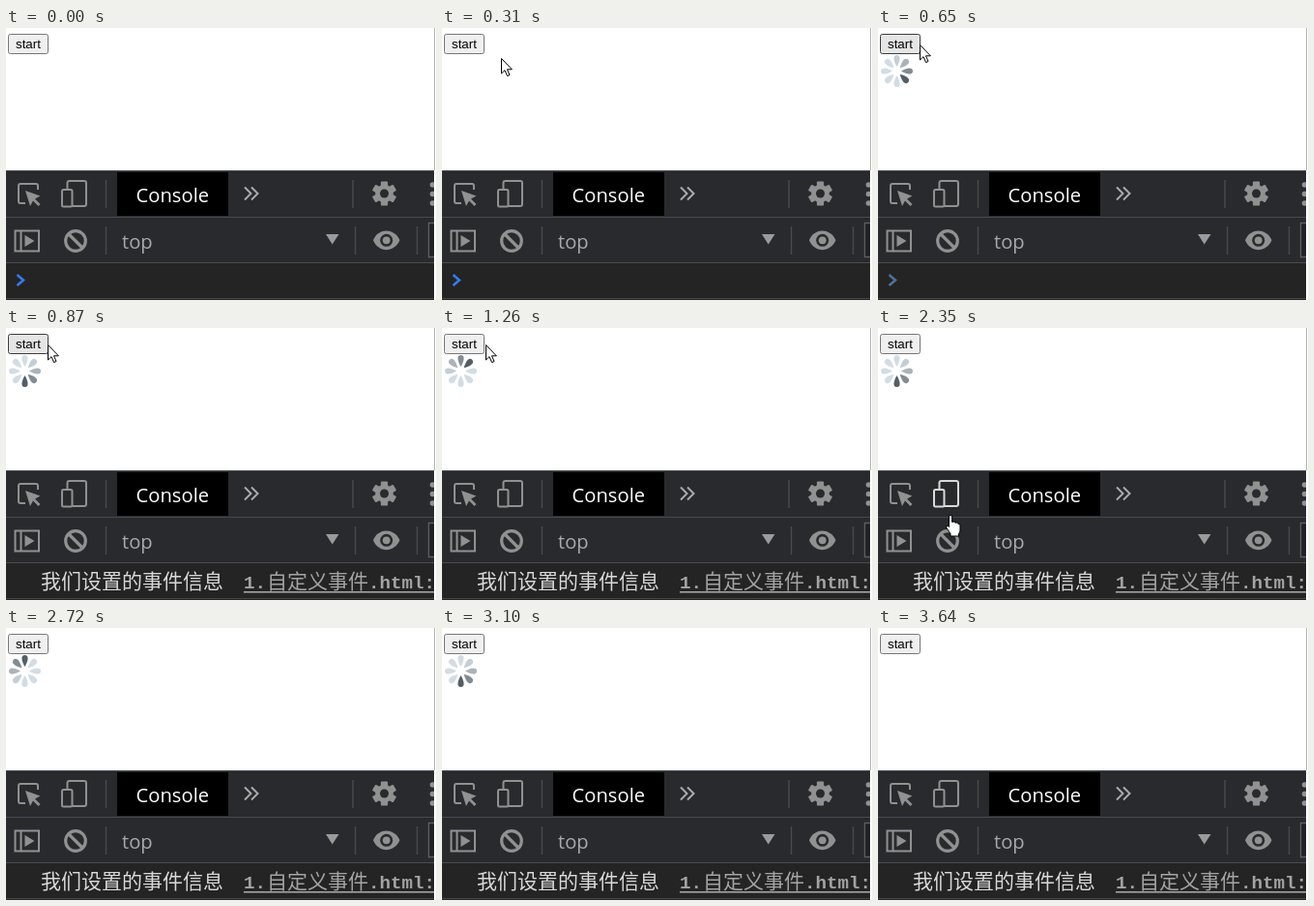
An HTML page that plays this animation: 445x281 px, repeating every 4040 ms.

```html
<!DOCTYPE html>
<html lang="zh">
<head>
<meta charset="utf-8">
<title>Custom event demo</title>
<style>
html, body { margin: 0; width: 100%; height: 100%; overflow: hidden; background: #fff; }
svg { display: block; width: 445px; height: 281px; }
.ui { font: 20.2px "Open Sans", sans-serif; }
.btn { font: 13.33px "Liberation Sans", Arial, sans-serif; }
.cjk { font: 21px "Noto Sans CJK SC", "Noto Sans CJK", sans-serif; }
.mono { font: bold 19.2px "Liberation Mono", monospace; }
.line { fill: none; stroke: #919191; stroke-width: 2; }
.fill { fill: #919191; }
.sep { fill: none; stroke: #494a4d; stroke-width: 1.4; }
.pointer { fill: #fff; stroke: #000; stroke-linejoin: round; }
</style>
</head>
<body>
<svg viewBox="0 0 445 281">
  <rect width="445" height="281" fill="#fff"/>
  <path d="M443.5 0V147" stroke="#b4b4b4"/>

  <rect id="button" x="2.5" y="6.5" width="41" height="20" rx="2"/>
  <text class="btn" x="10" y="21" fill="#000">start</text>
  <g id="spinner" transform="translate(19.5 44.5)"></g>

  <!-- developer tools panel -->
  <rect y="147" width="443" height="134" fill="#292a2d"/>
  <rect y="147" width="443" height="1" fill="#4b4c4f"/>
  <rect y="195" width="443" height="1" fill="#494a4d"/>
  <rect y="242" width="443" height="39" fill="#242424"/>
  <rect y="242" width="443" height="1" fill="#4b4c4f"/>
  <rect y="279" width="443" height="1" fill="#454648"/>
  <rect x="115" y="149" width="115" height="45" fill="#000"/>
  <text class="ui" x="134.5" y="180" fill="#fff">Console</text>
  <text class="ui" x="120" y="228" fill="#a6a9ad">top</text>
  <path class="sep" d="M103.5 157V186M359 157V186M103.5 205V234M361.5 205V234M425.5 205V234"/>

  <path class="line" d="M20 181H15Q13 181 13 179V163Q13 161 15 161H31Q33 161 33 163V167"/>
  <path class="fill" d="M20 168L35.5 173.5L30 176.5L35.5 182L33.5 184L28 178.5L25 184Z"/>
  <g id="device" class="line">
    <path d="M63.5 166V160Q63.5 158 65.5 158H81Q83 158 83 160V182Q83 184 81 184H69"/>
    <rect x="58" y="167" width="10.5" height="17.5" rx="1.5"/>
  </g>
  <path class="line" style="stroke:#ababab" d="M247 164.5L253.5 171L247 177.5M254 164.5L260.5 171L254 177.5"/>
  <g transform="translate(391.5 171)">
    <g id="gear" class="fill"></g>
    <circle r="4.5" fill="#292a2d"/>
  </g>
  <g id="dots" class="fill"></g>

  <path class="line" d="M9.5 209.5H34V230.5H9.5ZM15.5 209V231"/>
  <path class="fill" d="M19.5 214L29.5 220L19.5 226Z"/>
  <g class="line" style="stroke-width:3.2">
    <circle cx="72" cy="220" r="10.3"/>
    <path d="M65 213L79 227"/>
  </g>
  <path d="M331 213H344.5L337.7 223.5Z" fill="#9b9b9b"/>
  <path class="fill" d="M380 219.3C385 206.2 402 206.2 407.5 219.3C402 232.4 385 232.4 380 219.3Z"/>
  <circle cx="393.7" cy="219.3" r="6.5" fill="#292a2d"/>
  <circle class="fill" cx="393.7" cy="219.3" r="3.9"/>
  <path d="M443 201.5H437.5V236.5H443" fill="#202124" stroke="#5c5d60" stroke-width="1.4"/>

  <path id="prompt" d="M11.5 255L18 260.5L11.5 266" fill="none" stroke-width="2.5"/>
  <g id="message">
    <text class="cjk" x="36" y="268.8" fill="#d8d8d8">我们设置的事件信息</text>
    <g fill="#a4a4a4">
      <text class="mono" x="246" y="269">1.</text>
      <text class="cjk" x="270" y="268.8">自定义事件</text>
      <text class="mono" x="375" y="269">.html:</text>
      <rect x="246" y="272" width="197" height="1.6"/>
    </g>
  </g>
  <rect x="443" y="147" width="2" height="134" fill="#fff"/>

  <path id="arrow" class="pointer" d="M.5 .5V16L4 12.7L6.6 18.6L9 17.5L6.5 11.8H11.4Z"/>
  <path id="hand" class="pointer" d="M-1.5 12.5V2Q-1.5 .5 0 .5Q1.7 .5 1.7 2V7.5Q4.5 6 5 8.3Q7.3 7 7.8 9.3Q10 8.5 10 11V16Q10 18 8.5 19.5V22H0V19.5L-4 13.5Q-4.5 11 -3 11Z"/>
</svg>
<script>
const LOOP = 4040;
const HOVER = 390, LOAD = 645, LOG = 720, LEAVE = 1080, DROP = 2190, HAND = 2350, GONE = 2500, DONE = 3640;
const REFRESH = 76.7;   // ms between screen refreshes
const SPIN = 0.7826;    // petals the spinner turns per refresh

const $ = id => document.getElementById(id);
const show = (id, on) => { $(id).style.display = on ? "" : "none"; };

function add(parent, tag, attrs) {
  const el = document.createElementNS("http://www.w3.org/2000/svg", tag);
  for (const k in attrs) el.setAttribute(k, attrs[k]);
  return parent.appendChild(el);
}

// gear: a disc with three bars crossing it
add($("gear"), "circle", { r: 9.3 });
for (let a = 0; a < 180; a += 60) {
  add($("gear"), "rect", { x: -3.6, y: -12.6, width: 7.2, height: 25.2, rx: 1, transform: `rotate(${a})` });
}
for (let i = 0; i < 3; i++) add($("dots"), "circle", { cx: 441.5, cy: 162 + 9.5 * i, r: 2.8 });

const PETAL = "M0-16.5C4.6-16.5 3.6-10.5 0-4.5C-3.6-10.5-4.6-16.5 0-16.5Z";
const SHADES = ["#535e67", "#828c94", "#aab3ba", "#c4ced6", "#d2dce4"];
const petals = Array.from({ length: 8 }, (_, i) =>
  add($("spinner"), "path", { d: PETAL, transform: `rotate(${i * 45})` }));

const mix = (a, b, p) => Math.round(a + (b - a) * p);

// progress from one time to another, advancing in n equal jumps
function jumps(t, from, to, n) {
  const p = Math.floor((t - from) / (to - from) * n + 1e-6) / n;
  return Math.min(1, Math.max(0, p));
}

function pointerAt(t) {
  const come = 1 - (1 - jumps(t, 70, HOVER, 4)) ** 2;
  const drift = jumps(t, LEAVE, 1500, 7) ** 3;
  const drop = jumps(t, DROP, HAND, 2);
  const x = mix(325, 43, come) + mix(0, 23, drift) + mix(0, 9, drop);
  const y = mix(247, 17, come) - mix(0, 1, drift) + mix(0, 177, drop);
  return `translate(${x} ${y})`;
}

function drawSpinner(t) {
  const tick = Math.floor((t - LOAD) / REFRESH);
  const head = Math.floor(3.08 + tick * SPIN);
  petals.forEach((p, i) => p.setAttribute("fill", SHADES[Math.min((head - i + 8) % 8, 4)]));
}

function draw(t) {
  const spinning = t >= LOAD && t < DONE;
  show("spinner", spinning);
  if (spinning) drawSpinner(t);

  const over = t >= HOVER && t < LEAVE;
  $("button").setAttribute("fill", over ? "#e5e5e5" : "#efefef");
  $("button").setAttribute("stroke", over ? "#3c3c3c" : "#767676");

  show("message", t >= LOG);
  show("prompt", t < LOG);
  $("prompt").setAttribute("stroke", t < HOVER ? "#367cf1" : "#4f7499");

  const onDevice = t >= HAND && t < GONE;
  $("device").style.stroke = onDevice ? "#dadada" : "";
  show("arrow", t >= 70 && t < HAND);
  show("hand", onDevice);
  for (const id of ["arrow", "hand"]) $(id).setAttribute("transform", pointerAt(t));
}

const start = performance.now();
function frame() {
  draw((performance.now() - start) % LOOP);
  requestAnimationFrame(frame);
}
draw(0);
requestAnimationFrame(frame);
</script>
</body>
</html>
```
